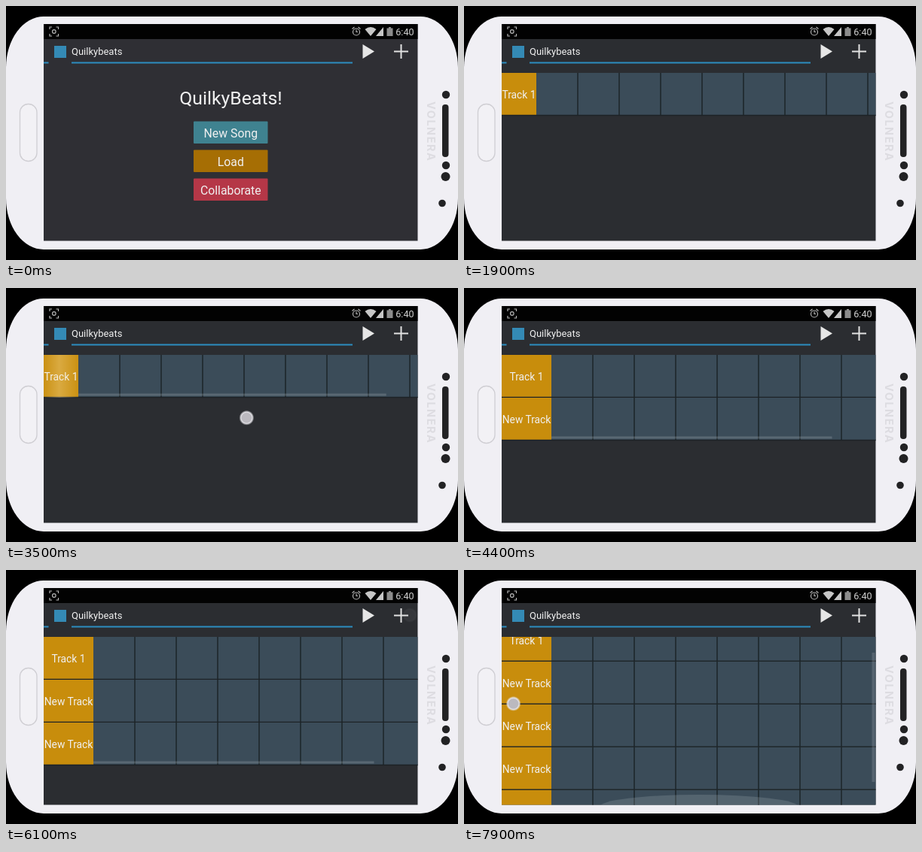
Animation, 600 px wide and 338 px high, one loop 8000 ms. Source, as an HTML page:

```html
<!DOCTYPE html>
<html lang="en">
<head>
<meta charset="utf-8">
<style>
html, body { margin: 0; width: 100%; height: 100%; overflow: hidden; background: #000; }
svg { display: block; width: 600px; height: 338px; font-family: Roboto, sans-serif; fill: #f0f0f0; }
.mid { text-anchor: middle; }
.button { font-size: 15.8px; }
.row { font-size: 13.8px; }
</style>
</head>
<body>
<svg viewBox="0 0 600 338">
  <defs>
    <clipPath id="view"><rect x="50" y="89" width="496.5" height="223.5"/></clipPath>
    <radialGradient id="touch">
      <stop offset=".62" stop-color="#bbb9bf"/>
      <stop offset=".75" stop-color="#e4e3e8"/>
      <stop offset="1" stop-color="#e4e3e8" stop-opacity="0"/>
    </radialGradient>
    <linearGradient id="edge">
      <stop offset="0" stop-color="#ffe7b0" stop-opacity=".05"/>
      <stop offset=".45" stop-color="#ffe7b0" stop-opacity=".4"/>
      <stop offset="1" stop-color="#ffe7b0" stop-opacity=".05"/>
    </linearGradient>
  </defs>

  <!-- phone -->
  <rect y="14" width="600" height="310" rx="50" ry="68" fill="#f0eff4"/>
  <rect x="18.5" y="130.5" width="22.5" height="76" rx="11" fill="#f2f1f5" stroke="#cfced3" stroke-width="1.3"/>
  <g fill="#222224">
    <circle cx="584" cy="118" r="5.2"/>
    <rect x="579" y="131" width="8.5" height="70" rx="4"/>
    <circle cx="584" cy="212" r="5.2"/>
    <circle cx="583.5" cy="227" r="6"/>
    <circle cx="579" cy="262.5" r="4.8"/>
  </g>
  <text transform="translate(558.5 127) rotate(90)" font-family="Inter, sans-serif" font-size="14.5" font-weight="700" letter-spacing="1.5" fill="#dddce1">VOLNERA</text>

  <!-- screen -->
  <rect id="screen" x="50" y="24" width="496.5" height="288.5"/>
  <rect x="50" y="24" width="496.5" height="20" fill="#020202"/>
  <g fill="none" stroke="#b4b4b4" stroke-width="1.2">
    <path d="M58 31v-3h3M66.500 28h3v3M69.500 37v3h-3M61 40h-3v-3"/>
    <circle cx="63.800" cy="34" r="2.300"/>
    <circle cx="465" cy="34.500" r="4.500"/>
    <path d="M465 31.500v3h2M459.500 30.500l3-2.500M470.500 30.500l-3-2.500"/>
  </g>
  <path d="M476.500 31q7.500-6 15 0l-7.500 9zM501 28v12h-10z" fill="#c6c6c6"/>
  <path d="M508 28h3v1.500h2.500v10.500h-8v-10.500h2.500z" fill="#8c8c8c"/>
  <text x="517.300" y="38.700" font-size="12.600" fill="#d0d0d0">6:40</text>
  <rect x="64" y="53" width="16" height="16" fill="#348ab5"/>
  <text x="87" y="65" font-size="13">Quilkybeats</text>
  <path d="M50 75.500h6.500M87 75.500h373" stroke="#2d8dc0" stroke-width="2"/>
  <path d="M473.500 51l15.500 9.500l-15.500 9.500z" fill="#e6e6e6"/>
  <path d="M515 60.500h19M524.500 51v19" stroke="#e2e2e2" stroke-width="2"/>

  <g id="menu" class="mid">
    <text x="298.500" y="130.800" font-size="24.800">QuilkyBeats!</text>
  </g>
  <g id="song" clip-path="url(#view)">
    <g id="grid"></g>
    <rect id="leftGlow" x="50" y="89" width="46" height="57" fill="url(#edge)"/>
    <ellipse id="lowGlow" cx="312" cy="315" rx="132" ry="16" fill="#b9c2c8"/>
    <rect id="hbar" height="3" fill="#b4bcc0"/>
    <rect id="vbar" x="541.5" width="4" fill="#b4bcc0"/>
  </g>
  <circle id="dot" r="10" fill="url(#touch)"/>
</svg>
<script>
const LOOP = 8000, CELL = 55, COLS = 9, ROW = 57, WIDE = 496, HIGH = 224;
const $ = id => document.getElementById(id);

function add(parent, tag, attrs, text = '') {
  const el = document.createElementNS('http://www.w3.org/2000/svg', tag);
  set(el, attrs);
  el.textContent = text;
  return parent.appendChild(el);
}
function set(el, attrs) {
  for (const k in attrs) el.setAttribute(k, attrs[k]);
}

[['New Song', '#3f8290'], ['Load', '#a66e04'], ['Collaborate', '#b53747']].forEach(([name, fill], i) => {
  const y = 153.5 + i * 38;
  add($('menu'), 'rect', { x: 249, y, width: 98.5, height: 29.5, rx: 1, fill });
  add($('menu'), 'text', { x: 298.3, y: y + 21, class: 'button' }, name);
});

// The first tap opens a song with one track, each later one adds a track.
const taps = [800, 4200, 5950, 6250, 6600];

// A drag goes straight from one point to another, then turns towards a third.
const drags = [
  { start: 2500, turn: 3000, end: 3700, from: [330, 168], via: [260, 172], to: [343, 173] },
  { start: 4900, turn: 5300, end: 5700, from: [157, 133], via: [111, 134], to: [157, 134] },
  { start: 6900, turn: 7600, end: 8000, from: [233, 286], via: [116, 141], to: [49, 190] }
];

const rows = taps.map((_, i) => {
  const g = add($('grid'), 'g', { transform: `translate(0 ${i * ROW})`, class: 'row mid' });
  const head = add(g, 'rect', { height: ROW, fill: '#c88d0c' });
  const cells = add(g, 'g', {});
  add(cells, 'rect', { width: COLS * CELL, height: ROW, fill: '#3b4c59' });
  for (let c = 1; c < COLS; c++)
    add(cells, 'path', { d: `M${c * CELL} 0v${ROW}`, stroke: '#1d2429', 'stroke-width': 1.5 });
  add(g, 'path', { d: `M0 ${ROW - .5}h561`, stroke: '#1d2226', 'stroke-width': 1.5 });
  const label = add(g, 'text', { y: 34 }, i ? 'New Track' : 'Track 1');
  return { g, head, cells, label };
});

const clamp = (v, lo, hi) => Math.min(hi, Math.max(lo, v));
const bump = (t, peak, span) => Math.max(0, 1 - Math.abs(t - peak) / span);
const shown = (t, from, to) => clamp(Math.min(t - from, to - t) / 100, 0, 1);

function finger(d, t) {
  const back = t > d.turn;
  const [a, b] = back ? [d.via, d.to] : [d.from, d.via];
  const u = back ? (t - d.turn) / (d.end - d.turn) : (t - d.start) / (d.turn - d.start);
  return a.map((v, i) => v + (b[i] - v) * clamp(u, 0, 1));
}

// The content follows the finger until it reaches its end.
function scroll(d, t, axis, max) {
  const pos = finger(d, t)[axis];
  const peak = Math.min(max, d.from[axis] - d.via[axis]);
  return clamp(t > d.turn ? peak - pos + d.via[axis] : d.from[axis] - pos, 0, max);
}

function drawTouch(t) {
  const drag = drags.find(d => shown(t, d.start - 100, d.end + 100) > 0);
  const press = Math.max(...taps.map(tap => bump(t, tap, 160)));
  const [cx, cy] = drag ? finger(drag, t) : t < 2000 ? [298, 170] : [536, 60];
  const opacity = drag ? shown(t, drag.start - 100, drag.end + 100) : press;
  set($('dot'), { cx, cy, opacity });
}

function drawSong(t, count) {
  const headWidth = count > 1 ? 66 : 46;
  const total = headWidth + COLS * CELL, tall = Math.max(HIGH, count * ROW);
  const sx = scroll(drags[t < 4000 ? 0 : 1], t, 0, 45);
  const sy = scroll(drags[2], t, 1, tall - HIGH);

  set($('grid'), { transform: `translate(${50 - sx} ${89 - sy})` });
  rows.forEach(({ g, head, cells, label }, i) => {
    g.style.display = i < count ? '' : 'none';
    set(head, { width: headWidth });
    set(cells, { transform: `translate(${headWidth} 0)` });
    set(label, { x: headWidth / 2 });
  });

  const left = 50 + sx * WIDE / total;
  const x = Math.max(left, 50 + headWidth - sx);
  set($('hbar'), {
    x, width: left + WIDE * WIDE / total - x, y: 83.5 + Math.min(count * ROW, HIGH),
    opacity: .25 * Math.max(shown(t, 2500, 3900), shown(t, taps[1], 6500))
  });
  set($('vbar'), {
    y: 91 + sy * HIGH / tall, height: HIGH * HIGH / tall - 4,
    opacity: .22 * shown(t, taps[4], LOOP + 100)
  });
  set($('leftGlow'), { opacity: bump(t, 3550, 250) });
  set($('lowGlow'), { opacity: .4 * bump(t, 7700, 400) });
}

function draw(t) {
  const count = taps.filter(tap => t >= tap).length;
  $('menu').style.display = count ? 'none' : '';
  $('song').style.display = count ? '' : 'none';
  set($('screen'), { fill: count ? '#2b2d31' : '#2f2f34' });
  drawSong(t, count);
  drawTouch(t);
}

function tick() {
  draw(performance.now() % LOOP);
  requestAnimationFrame(tick);
}
tick();
</script>
</body>
</html>
```
